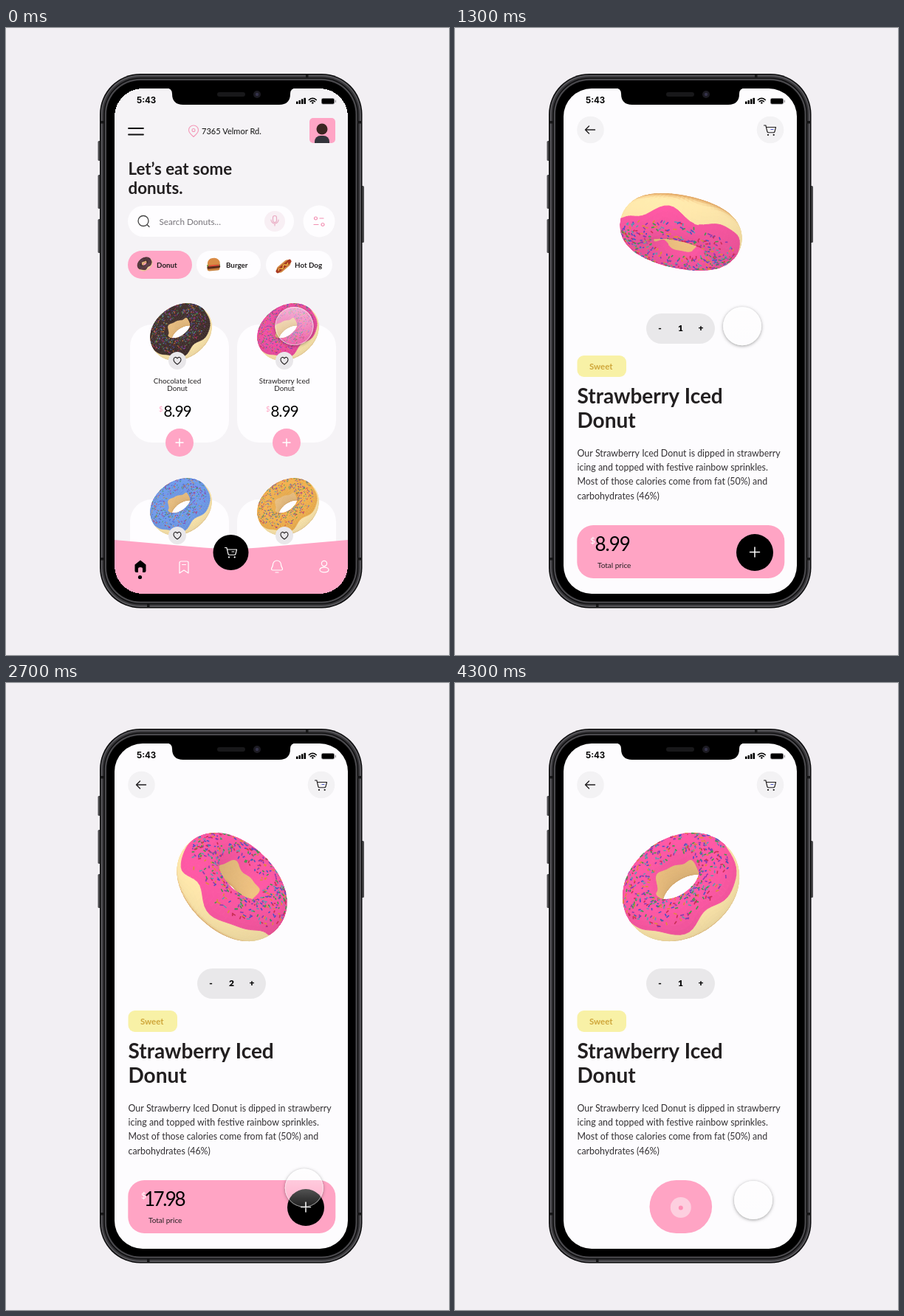
An HTML page with a canvas that plays this animation: 600x850 px, repeating every 4400 ms.

```html
<!DOCTYPE html>
<html lang="en">
<head>
<meta charset="utf-8">
<title>Donut shop</title>
<style>
  html, body { margin: 0; width: 100%; height: 100%; overflow: hidden; background: #f2eff3; }
  canvas { display: block; }
</style>
</head>
<body>
<canvas id="stage" width="600" height="850"></canvas>
<script>
const LOOP = 4400, STEP = 100;
const PINK = '#ffa5c5', INK = '#221f20', WHITE = '#fefdff';
const stage = document.getElementById('stage').getContext('2d');
let g = stage;

// ---------- drawing helpers ----------
const clamp = v => Math.max(0, Math.min(1, v));
const span = (t, from, to) => clamp((t - from) / (to - from));
const smooth = p => p * p * (3 - 2 * p);
const mix = (a, b, p) => a + (b - a) * p;

function box(x, y, w, h, r, color) {
  g.fillStyle = color;
  g.beginPath(); g.roundRect(x, y, w, h, r); g.fill();
}
function disc(x, y, r, color) {
  g.fillStyle = color;
  g.beginPath(); g.arc(x, y, r, 0, 7); g.fill();
}
function icon(x, y, d, color, width = 1.4) {
  g.save();
  g.translate(x, y);
  g.lineCap = g.lineJoin = 'round';
  g.lineWidth = width;
  g.strokeStyle = g.fillStyle = color;
  if (width) g.stroke(new Path2D(d)); else g.fill(new Path2D(d));
  g.restore();
}
function text(str, x, y, size, color = INK, { weight = 400, align = 'left', spacing = 0, family = 'Lato' } = {}) {
  g.font = `${weight} ${size}px ${family}, sans-serif`;
  g.letterSpacing = spacing + 'px';
  g.textAlign = align;
  g.fillStyle = color;
  g.fillText(str, x, y);
}
function layer(draw) {
  const outer = g;
  g = new OffscreenCanvas(600, 850).getContext('2d');
  draw();
  const canvas = g.canvas;
  g = outer;
  return canvas;
}
function seeded(seed) {
  return () => (seed = (seed * 16807) % 2147483647) / 2147483647;
}
const plus = (x, y, r, color, w) => icon(x, y, `M${-r} 0H${r}M0 ${-r}V${r}`, color, w);
function cart(x, y, color, accent) {
  icon(x, y, 'M-8-6.5h2.4l2 8.5q.3 1.2 1.5 1.2H5q1.200 0 1.500-1.200L8-4H-4.800', color, 1.15);
  icon(x, y, 'M1.5-1h3', accent, 1.2);
  disc(x - 2.5, y + 6.4, 1.1, color);
  disc(x + 5.2, y + 6.4, 1.1, color);
}

// ---------- donut: a shaded torus ----------
const cross = (a, b) => [a[1] * b[2] - a[2] * b[1], a[2] * b[0] - a[0] * b[2], a[0] * b[1] - a[1] * b[0]];
const unit = a => { const n = Math.hypot(...a); return a.map(c => c / n); };
function rotate(v, k, angle) {
  const c = Math.cos(angle), s = Math.sin(angle), w = cross(k, v);
  const d = (k[0] * v[0] + k[1] * v[1] + k[2] * v[2]) * (1 - c);
  return v.map((e, i) => e * c + w[i] * s + k[i] * d);
}

const REST_AXIS = unit([-.42, -.61, .67]);
const REST_U = unit([.82, -.565, 0]);
const REST = [REST_U, cross(REST_AXIS, REST_U), REST_AXIS];
const FLIP = unit(cross(REST_AXIS, [-.1, -.98, .15]));
const RING = 57, TUBE = 26, HEIGHT = 31, SECTORS = 80;
const FROSTING_ROWS = 10, DOUGH_ROWS = 20;
const CREAM = [255, 232, 172], TAN = [226, 166, 98];
const STRAWBERRY = [252, 88, 163];
const SPRINKLES = ['#3f9a4c', '#4a51c4', '#8a3cae', '#e08a3c', '#c92f55', '#5b9bb0'];

const outerEdge = u => .12 + .22 * Math.sin(5 * u + 1) + .1 * Math.sin(8 * u + 2);
const innerEdge = u => 2.72 + .12 * Math.sin(4 * u) + .06 * Math.sin(7 * u + 1);

const rand = seeded(77);
const sprinkles = Array.from({ length: 520 }, () => ({
  u: rand() * 2 * Math.PI, v: mix(.5, 2.4, rand()), turn: rand() * Math.PI,
  color: SPRINKLES[Math.floor(rand() * SPRINKLES.length)]
}));

function doughColor(v) {
  const away = Math.abs(v - 1.5 * Math.PI);
  const p = smooth(clamp((away - .4) / .65)) * (v < 1.5 * Math.PI ? .4 : 1);
  return TAN.map((c, i) => mix(c, CREAM[i], p));
}

function donut(cx, cy, scale, frosting, frame = REST) {
  const [e1, e2, axis] = frame;
  const place = (u, r, h) => {
    const a = Math.cos(u) * r, b = Math.sin(u) * r;
    return e1.map((c, i) => c * a + e2[i] * b + axis[i] * h);
  };
  const point = (u, v) => place(u, RING + TUBE * Math.cos(v), HEIGHT * Math.sin(v));
  const normal = (u, v) => unit(place(u, Math.cos(v) / TUBE, Math.sin(v) / HEIGHT));
  const parts = [];
  const patch = (u0, u1, from, to, rows, colorAt) => {
    const at = (u, k) => mix(from(u), to(u), k / rows);
    for (let j = 0; j < rows; j++) {
      const u = (u0 + u1) / 2, v = at(u, j + .5), n = normal(u, v);
      if (n[2] < -.12) continue;
      const corners = [point(u0, at(u0, j)), point(u1, at(u1, j)), point(u1, at(u1, j + 1)), point(u0, at(u0, j + 1))];
      const light = .95 + .04 * n[2] - .05 * n[1] - .02 * n[0];
      const rgb = colorAt(v).map(c => Math.min(255, c * light));
      parts.push({ corners, z: corners.reduce((s, p) => s + p[2], 0) / 4, color: `rgb(${rgb})` });
    }
  };
  for (let i = 0; i < SECTORS; i++) {
    const u0 = i / SECTORS * 2 * Math.PI, u1 = (i + 1) / SECTORS * 2 * Math.PI;
    patch(u0, u1, outerEdge, innerEdge, FROSTING_ROWS, () => frosting);
    patch(u0, u1, innerEdge, u => outerEdge(u) + 2 * Math.PI, DOUGH_ROWS, doughColor);
  }
  for (const s of sprinkles) {
    if (normal(s.u, s.v)[2] < .05) continue;
    const du = .035 * Math.cos(s.turn), dv = .07 * Math.sin(s.turn);
    const corners = [point(s.u - du, s.v - dv), point(s.u + du, s.v + dv)];
    parts.push({ corners, z: corners[0][2] + 5, color: s.color });
  }
  parts.sort((a, b) => a.z - b.z);
  g.save();
  g.translate(cx, cy);
  g.scale(scale, scale);
  g.lineJoin = 'round';
  for (const { corners, color } of parts) {
    const solid = corners.length > 2;
    g.beginPath();
    corners.forEach(p => g.lineTo(p[0], p[1]));
    g.fillStyle = g.strokeStyle = color;
    g.lineWidth = solid ? .9 : 1.6;
    if (solid) { g.closePath(); g.fill(); }
    g.stroke();
  }
  g.restore();
}

// ---------- home screen ----------
function product(x, y, name, frosting) {
  box(x, y, 134, 160, 30, WHITE);
  donut(x + 69, y + 10, .525, frosting);
  disc(x + 64, y + 49, 12, '#e9e7ea');
  icon(x + 64, y + 49, 'M0 5C-3 3-5 1-5-1.5C-5-5-1.5-5.5 0-3C1.5-5.5 5-5 5-1.5C5 1 3 3 0 5Z', INK, 1.1);
  text(name, x + 64, y + 80, 9.9, INK, { align: 'center' });
  text('Donut', x + 64, y + 90, 9.9, INK, { align: 'center' });
  text('$', x + 39, y + 118, 9.5, PINK);
  text('8.99', x + 45.5, y + 125, 20.5, '#000', { spacing: -.8 });
  disc(x + 67, y + 160, 19, PINK);
  plus(x + 67, y + 160, 5, '#fff', 1.5);
}
function chip(x, w, label, labelX, color) {
  box(x, 302, w, 38, 19, color);
  text(label, labelX, 325, 9.8, INK, { weight: 700 });
}
function burger(x, y) {
  g.save(); g.translate(x, y); g.rotate(-.1);
  box(-9, 2, 17, 6, 3, '#c9833f');
  box(-9, -1, 18, 3, 1.5, '#6b9a38');
  box(-9, 1, 18, 4, 2, '#5a2c1c');
  box(-7, 0, 15, 2, 1, '#e8503a');
  box(-8, -9, 17, 9, [8, 8, 2, 2], '#d98b45');
  g.restore();
}
function hotDog(x, y) {
  g.save(); g.translate(x, y); g.rotate(-.7);
  box(-11, -4.5, 22, 9, 4.5, '#d28a45');
  box(-13, -2.5, 26, 5, 2.5, '#a83a22');
  icon(0, 0, 'M-9 0q2-3 4 0t4 0t4 0t4 0', '#f6cf4d', 1.2);
  g.restore();
}
function home() {
  box(140, 75, 330, 700, 0, '#f5f3f6');
  icon(165, 136, 'M1 0H21M1 8.5H21', '#111', 1.8);
  icon(254, 140, 'M0 7.5C-4 4-6.5 1.5-6.5-1.5A6.5 6.5 0 0 1 6.5-1.5C6.5 1.5 4 4 0 7.5ZM2-1.5a2 2 0 1 1-4 0a2 2 0 1 1 4 0', '#f39ab9', 1.1);
  text('7365 Velmor Rd.', 265, 144, 11, '#111');

  box(411, 122, 35, 34, 5, PINK);
  disc(428, 137, 7.5, '#3b2521');
  box(418, 146, 20, 10, [8, 8, 0, 0], '#33343b');

  text('Let’s eat some', 165.5, 199, 22.3, INK, { weight: 700 });
  text('donuts.', 165.5, 225, 22.3, INK, { weight: 700 });

  box(165, 241, 225, 42, 21, WHITE);
  icon(186, 261.5, 'M7 0a7 7 0 1 1-14 0a7 7 0 1 1 14 0M5.5 5.5L8 8', '#444', 1.3);
  text('Search Donuts...', 207.5, 266.5, 11.7, '#77747a');
  disc(364, 262, 14, '#f8eff4');
  icon(364, 261, 'M-2.5-4a2.5 2.5 0 0 1 5 0v4a2.5 2.5 0 0 1-5 0zM-5-1a5 5 0 0 0 10 0M0 4.5V7', '#e9a9c1', 1.1);
  disc(424, 262, 21.5, WHITE);
  icon(424, 262, 'M-2.5-4a2 2 0 1 1-4 0a2 2 0 1 1 4 0M1-4H6M-7 4.5H-1M7 4.5a2 2 0 1 1-4 0a2 2 0 1 1 4 0', '#f28fb2', 1.2);

  chip(165, 87, 'Donut', 204, PINK);
  chip(258, 87, 'Burger', 298, WHITE);
  chip(352, 90, 'Hot Dog', 391, WHITE);
  donut(188, 320, .125, [58, 42, 40]);
  burger(281, 321);
  hotDog(376, 323);

  product(168, 402, 'Chocolate Iced', [62, 44, 42]);
  product(313, 402, 'Strawberry Iced', [236, 74, 158]);
  product(168, 639, 'Blueberry Iced', [108, 152, 232]);
  product(313, 639, 'Orange Iced', [238, 174, 76]);

  icon(0, 0, 'M140 693.5L268 704.5Q305 708 342 704.5L470 693.5V775H140Z', PINK, 0);
  disc(304.5, 711, 24, '#000');
  cart(304.5, 711, '#fff', '#fff');
  icon(182, 730, 'M0-8.5L7.5-2.5V6Q7.5 8 5.5 8H3V3Q3 1 0 1T-3 3V8H-5.5Q-7.5 8-7.5 6V-2.5Z', '#000', 0);
  disc(181.5, 744.5, 2.6, '#000');
  icon(241, 731, 'M-6-6q0-2 2-2h8q2 0 2 2V8L0 4L-6 8ZM-2.5-3.5h5', '#fff', 1.2);
  icon(367, 730, 'M0-8a5.5 5.5 0 0 0-5.5 5.5c0 3-2 4-2 6c0 1.5 1 1.5 2 1.5h11c1 0 2 0 2-1.5c0-2-2-3-2-6A5.5 5.5 0 0 0 0-8M-2 8h4', '#fff', 1.2);
  icon(431, 730, 'M3.6-4a3.6 3.6 0 1 1-7.2 0a3.6 3.6 0 1 1 7.2 0M6 4.5c0 4.5-12 4.5-12 0s12-4.5 12 0', '#fff', 1.2);
}

// ---------- detail screen ----------
function pose(t) {
  const flip = 2 * Math.PI * smooth(span(t, 690, 1640));
  const spin = -2 * Math.PI * smooth(span(t, 1830, 3080));
  return REST.map(v => rotate(rotate(v, FLIP, flip), [0, 1, 0], spin));
}
function orderBar(t, count) {
  const half = mix(140.5, 36, smooth(span(t, 3930, 4365)));
  box(305.8 - half, 674, 2 * half, 72, mix(22, 36, span(t, 3930, 4250)), '#ffa4c4');

  g.globalAlpha = 1 - span(t, 3500, 3800);
  text('$', 183, 699, 12, '#fff');
  if (count === 1) text('8.99', 189.5, 709, 26, '#000', { spacing: -1 });
  else text('17.98', 187, 709, 26, '#000', { spacing: -2.5 });
  text('Total price', 193, 732, 10);
  disc(406, 711, 25, '#000');
  plus(406, 710.5, 6.5, '#fff', 1.5);
  g.globalAlpha = 1;

  const grow = span(t, 4100, 4300);
  if (grow) {
    disc(305.8, 711, 14 * grow, '#fdcfdf');
    disc(305.8, 711.5, 3 * grow, '#ff8fb6');
  }
}
function detail(t) {
  const count = t >= 2000 && t < 3600 ? 2 : 1;
  const bold = { weight: 900, align: 'center' };
  box(147, 82, 316, 685, 38, '#fdfcfe');
  disc(183.5, 138, 18.3, '#f3f2f4');
  icon(183, 138, 'M6.5 0H-6.5L-1.5-5M-6.5 0L-1.5 5', INK, 1.4);
  disc(427, 138, 18.3, '#f3f2f4');
  cart(426.5, 138.5, INK, '#4a55c8');

  donut(306, 276.5, 1, STRAWBERRY, pose(t));

  box(259, 387, 93, 41, 20.5, '#e9e8ea');
  text('-', 277.5, 411, 12, '#000', bold);
  text(count, 305.5, 411, 12, '#000', bold);
  text('+', 333, 411, 12, '#000', bold);

  box(165.5, 444, 66.5, 29, 9, '#f8f1a6');
  text('Sweet', 182, 463, 11.4, '#cfa63a', { weight: 700 });
  text('Strawberry Iced', 165.5, 509, 28, INK, { weight: 700 });
  text('Donut', 165.5, 542, 28, INK, { weight: 700 });
  ['Our Strawberry Iced Donut is dipped in strawberry',
   'icing and topped with festive rainbow sprinkles.',
   'Most of those calories come from fat (50%) and',
   'carbohydrates (46%)'].forEach((row, i) => text(row, 165.5, 581 + 19.2 * i, 12.4, '#333033'));
  orderBar(t, count);
}

// ---------- touch pointer ----------
function pointer(t) {
  const aside = smooth(span(t, 1250, 1750)), down = span(t, 1960, 2930);
  const x = 390.5 - 52.5 * aside + 66 * (1 - (1 - down) ** 4);
  const y = 404 + 5 * aside + 292 * (1 - (1 - down) ** 2);
  const press = [500, 1850, 3450].reduce((s, at) => s + clamp(1 - Math.abs(t - at) / 200), 0);
  const r = 26 - 2 * press;

  // the shadow falls outside the glass only
  g.save();
  g.beginPath(); g.rect(0, 0, 600, 850); g.arc(x, y, r, 0, 7); g.clip('evenodd');
  g.shadowColor = 'rgba(0,0,0,.38)';
  g.shadowBlur = 4;
  g.shadowOffsetY = 1;
  disc(x, y, r, '#fff');
  g.restore();

  const sheen = g.createLinearGradient(0, y - r, 0, y + r);
  sheen.addColorStop(0, 'rgba(255,255,255,.55)');
  sheen.addColorStop(1, 'rgba(255,255,255,.12)');
  disc(x, y, r, sheen);
  g.strokeStyle = 'rgba(255,255,255,.45)';
  g.lineWidth = 1;
  g.beginPath(); g.arc(x, y, r - .5, 0, 7); g.stroke();
}

// ---------- phone ----------
function phoneBody() {
  [[153, 27], [199, 46], [259, 46]].forEach(([y, h]) => box(124.5, y, 5, h, 1.5, '#4b4a4d'));
  box(480, 214, 5, 77, 1.5, '#4b4a4d');
  const rim = (inset, color) =>
    box(127 + inset, 62 + inset, 355.5 - 2 * inset, 724.5 - 2 * inset, 55 - inset, color);
  rim(0, '#0a0a0b');
  rim(1.5, '#57565a');
  rim(3.5, '#343336');
  rim(5.5, '#0a0a0b');
  rim(6.8, '#4a494d');
  rim(9, '#000');
  for (const y of [126, 718]) {
    box(127.5, y, 6, 3.5, 0, '#161617');
    box(476, y, 6, 3.5, 0, '#161617');
  }
  box(406, 62.5, 3.5, 5, 0, '#161617');
  box(191, 781, 3.5, 5, 0, '#161617');
}
function statusBar() {
  icon(0, 0, 'M217 81H393Q385 82 385 89Q385 104 370 104H240Q225 104 225 89Q225 82 217 81Z', '#000', 0);
  box(286, 87, 38, 6, 3, '#18181a');
  disc(340, 90, 5, '#1c1b22');
  disc(340, 90, 2.2, '#35334a');
  text('5:43', 177, 102, 11.5, '#000', { weight: 700, family: 'Inter' });
  for (let i = 0; i < 4; i++) box(393 + 3.5 * i, 99.5 - 1.6 * i, 2.5, 3.5 + 1.6 * i, .6, '#000');
  icon(415.3, 101.5, 'M-5-4Q0-8.5 5-4M-3-1.8Q0-4.5 3-1.8', '#000', 1.6);
  disc(415.3, 101.5, 1.3, '#000');
  box(427, 95, 18, 8.5, 2.2, '#9a989c');
  box(427.7, 95.7, 16.6, 7.1, 1.7, '#000');
  box(445.8, 97.5, 1.2, 3.5, .6, '#9a989c');
}

const bodyLayer = layer(phoneBody);
const homeLayer = layer(() => {
  g.beginPath(); g.roundRect(147, 82, 316, 685, 38); g.clip();
  home();
});

function draw(t) {
  g.fillStyle = '#f2eff3';
  g.fillRect(0, 0, 600, 850);
  g.drawImage(bodyLayer, 0, 0);
  const opened = span(t, 600, 800);
  if (opened) detail(t);
  g.globalAlpha = 1 - opened;
  g.drawImage(homeLayer, 0, 0);
  g.globalAlpha = 1;
  statusBar();
  pointer(t);
}

let shown = -1;
function tick() {
  const t = Math.floor(performance.now() % LOOP / STEP) * STEP;
  if (t !== shown) draw(shown = t);
  requestAnimationFrame(tick);
}
tick();
</script>
</body>
</html>
```
